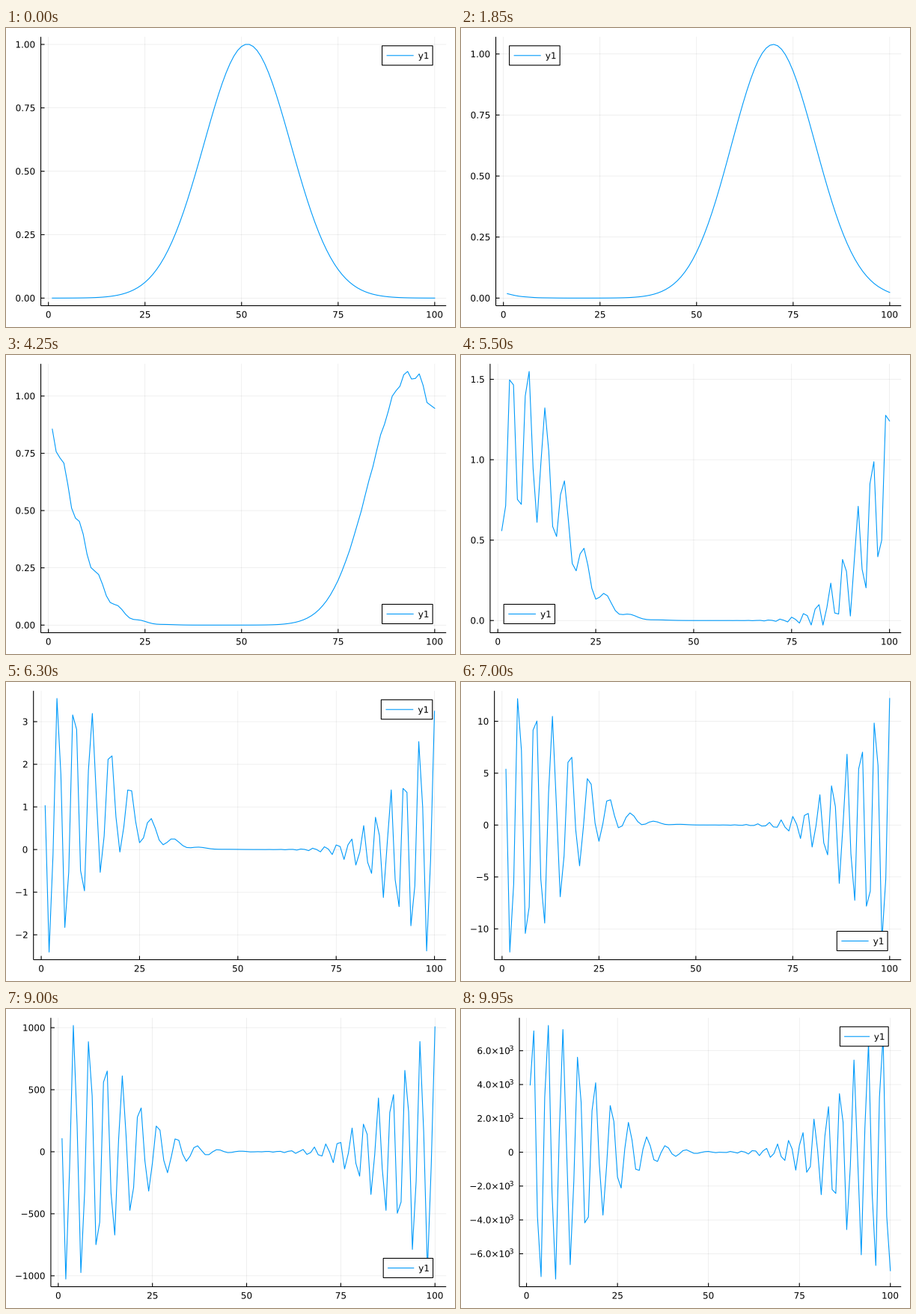
Write a matplotlib script that moves like this. It is 600 px wide and 400 px high and loops after 10 s.

```python
import math
from itertools import product

import matplotlib.pyplot as plt
import numpy as np
from matplotlib.animation import FuncAnimation
from matplotlib.collections import LineCollection
from matplotlib.patches import PathPatch, Rectangle
from matplotlib.textpath import TextPath
from matplotlib.transforms import Affine2D

WIDTH, HEIGHT, DPI = 600, 400, 100
FRAMES, INTERVAL = 200, 50
TOP, BOTTOM, RIGHT = 11.8, 371.5, 588.2
EM = 12
PT = 72 / DPI
BLUE = "#009afa"
N = 100
COURANT = 0.5
NICE_STEPS = ((1, 1.0), (5, 0.9), (2, 0.7), (2.5, 0.5), (3, 0.2))


def simulate():
    """Forward-time centred-space advection of a bell on a periodic grid."""
    x = 2 * np.pi * np.arange(N) / N
    u = np.exp(-(x - np.pi) ** 2)
    states = []
    for _ in range(FRAMES):
        u = u - COURANT / 2 * (np.roll(u, -1) - np.roll(u, 1))
        states.append(u)
    return states


def widen(values):
    lo, hi = values.min(), values.max()
    pad = 0.03 * (hi - lo)
    return lo - pad, hi + pad


def nice_ticks(lo, hi):
    """Score round steps by tick count, coverage and niceness."""
    span = hi - lo
    order = math.ceil(math.log10(span))
    best, chosen = (-math.inf, 0), None
    for z, (q, niceness) in product(range(order, order - 4, -1), NICE_STEPS):
        step = q * 10.0 ** z
        ticks = np.arange(math.ceil(lo / step), math.floor(hi / step) + 1) * step
        n = len(ticks)
        if not 4 <= n <= 8:
            continue
        count = 1 - abs(n - 5) / 5
        coverage = 1.5 * span / ((n - 1) * step)
        key = (round(count / 4 + coverage / 3 + niceness / 4, 9), -n)
        if key > best:
            best, chosen = key, ticks
    return chosen


def tick_labels(ticks):
    """Return (text, exponent) pairs; the exponent is empty for plain numbers."""
    if ticks[-1] - ticks[0] > 10000.5:
        labels = []
        for t in ticks:
            if abs(t) < 1e-9:
                labels.append(("0", ""))
                continue
            power = math.floor(math.log10(abs(t)) + 1e-9)
            text = f"{t / 10 ** power:.1f}×10".replace("-", "\u2212")
            labels.append((text, str(power)))
        return labels
    digits = 0
    while not np.allclose(np.round(ticks, digits), ticks, rtol=0, atol=1e-9):
        digits += 1
    return [(f"{t + 0.0:.{digits}f}".replace("-", "\u2212"), "") for t in ticks]


glyphs = {}


def text_shape(text, size=EM):
    """Outline of a text with its ink extents, built once per text and size."""
    key = (text, size)
    if key not in glyphs:
        path = TextPath((0, 0), text, size=size, prop={"family": "DejaVu Sans"})
        box = path.get_extents()
        glyphs[key] = path, box.x0, box.x1
    return glyphs[key]


def label_width(label):
    text, power = label
    _, x0, x1 = text_shape(text)
    return x1 - x0 + (4.2 if power else 0)


def legend_corner(x, y, xl, yl):
    """Pick the emptiest corner as (right, top) flags."""
    px = (x - xl[0]) / (xl[1] - xl[0])
    py = (y - yl[0]) / (yl[1] - yl[0])
    corners = [(1, 1), (0, 1), (1, 0), (0, 0)]
    crowd = []
    for cx, cy in corners:
        dx, dy = abs(px - cx), abs(py - cy)
        near = (dx <= 0.25) & (dy <= 0.25)
        crowd.append(np.sum(1 / (1 + 100 * (dx[near] ** 2 + dy[near] ** 2))))
    least = min(crowd)
    return next(c for c, v in zip(corners, crowd) if math.isclose(v, least, rel_tol=1.5e-8))


fig = plt.figure(figsize=(WIDTH / DPI, HEIGHT / DPI), dpi=DPI, facecolor="white")
ax = fig.add_axes([0, 0, 1, 1])
ax.set_xlim(0, WIDTH)
ax.set_ylim(HEIGHT, 0)
ax.axis("off")
ax.set_autoscale_on(False)

states = simulate()
grid_x = np.arange(1, N + 1)
x_lim = widen(grid_x)
x_ticks = nice_ticks(*x_lim)
x_labels = tick_labels(x_ticks)


def segments(lines, width, z, **style):
    ax.add_collection(LineCollection(lines, linewidths=width * PT, zorder=z, snap=False,
                                     **style), autolim=False)


def write(x, y, text, anchor, size=EM, z=4):
    """Draw text with its ink anchored at x: 0 left, 0.5 centre, 1 right."""
    path, x0, x1 = text_shape(text, size)
    shift = x - x0 - anchor * (x1 - x0)
    place = Affine2D().scale(1, -1).translate(shift, y)
    ax.add_artist(PathPatch(place.transform_path(path), facecolor="black", linewidth=0,
                            snap=False, zorder=z))


def draw_legend(left, corner):
    width = RIGHT - left
    unit = width / 45
    w, h = 4 * unit + 1.228 * EM + 4.7, 26
    x = RIGHT - width / 30 - w if corner[0] else left + width / 30
    y = TOP + 12 if corner[1] else BOTTOM - 12 - h
    ax.add_patch(Rectangle((x, y), w, h, facecolor="white", edgecolor="black",
                           linewidth=1.1 * PT, snap=False, zorder=5))
    mid = y + h / 2
    segments([[(x + unit / 2, mid), (x + 3.5 * unit, mid)]], 1.1, 6, colors=BLUE)
    write(x + 4 * unit + 0.4, mid + 4.4, "y1", 0, z=6)


def draw(frame):
    for artist in [*ax.lines, *ax.patches, *ax.collections]:
        artist.remove()

    u = states[frame]
    y_lim = widen(u)
    y_ticks = nice_ticks(*y_lim)
    y_labels = tick_labels(y_ticks)
    left = 21.4 + max(map(label_width, y_labels))

    def to_x(v):
        return left + (v - x_lim[0]) / (x_lim[1] - x_lim[0]) * (RIGHT - left)

    def to_y(v):
        return BOTTOM - (v - y_lim[0]) / (y_lim[1] - y_lim[0]) * (BOTTOM - TOP)

    xs, ys = to_x(x_ticks), to_y(y_ticks)
    segments([[(x, TOP), (x, BOTTOM)] for x in xs] + [[(left, y), (RIGHT, y)] for y in ys],
             0.6, 1, colors="black", alpha=0.1)
    axes = [[(left, TOP), (left, BOTTOM)], [(left, BOTTOM), (RIGHT, BOTTOM)]]
    axes += [[(x, BOTTOM), (x, BOTTOM - 5)] for x in xs]
    axes += [[(left, y), (left + 5, y)] for y in ys]
    segments(axes, 1.1, 2, colors="black")

    for x, (text, _) in zip(xs, x_labels):
        write(x, 387.6, text, 0.5)
    for y, (text, power) in zip(ys, y_labels):
        if power:
            write(left - 13, y + 4.4, text, 1)
            write(left - 8.2, y, power, 1, size=9.5)
        else:
            write(left - 8.2, y + 4.4, text, 1)

    ax.plot(to_x(grid_x), to_y(u), color=BLUE, linewidth=1.1 * PT,
            solid_joinstyle="round", snap=False, zorder=3)
    draw_legend(left, legend_corner(grid_x, u, x_lim, y_lim))
    return []


anim = FuncAnimation(fig, draw, frames=FRAMES, interval=INTERVAL, init_func=lambda: [],
                     repeat=True, repeat_delay=0, blit=False)
plt.show()
```
